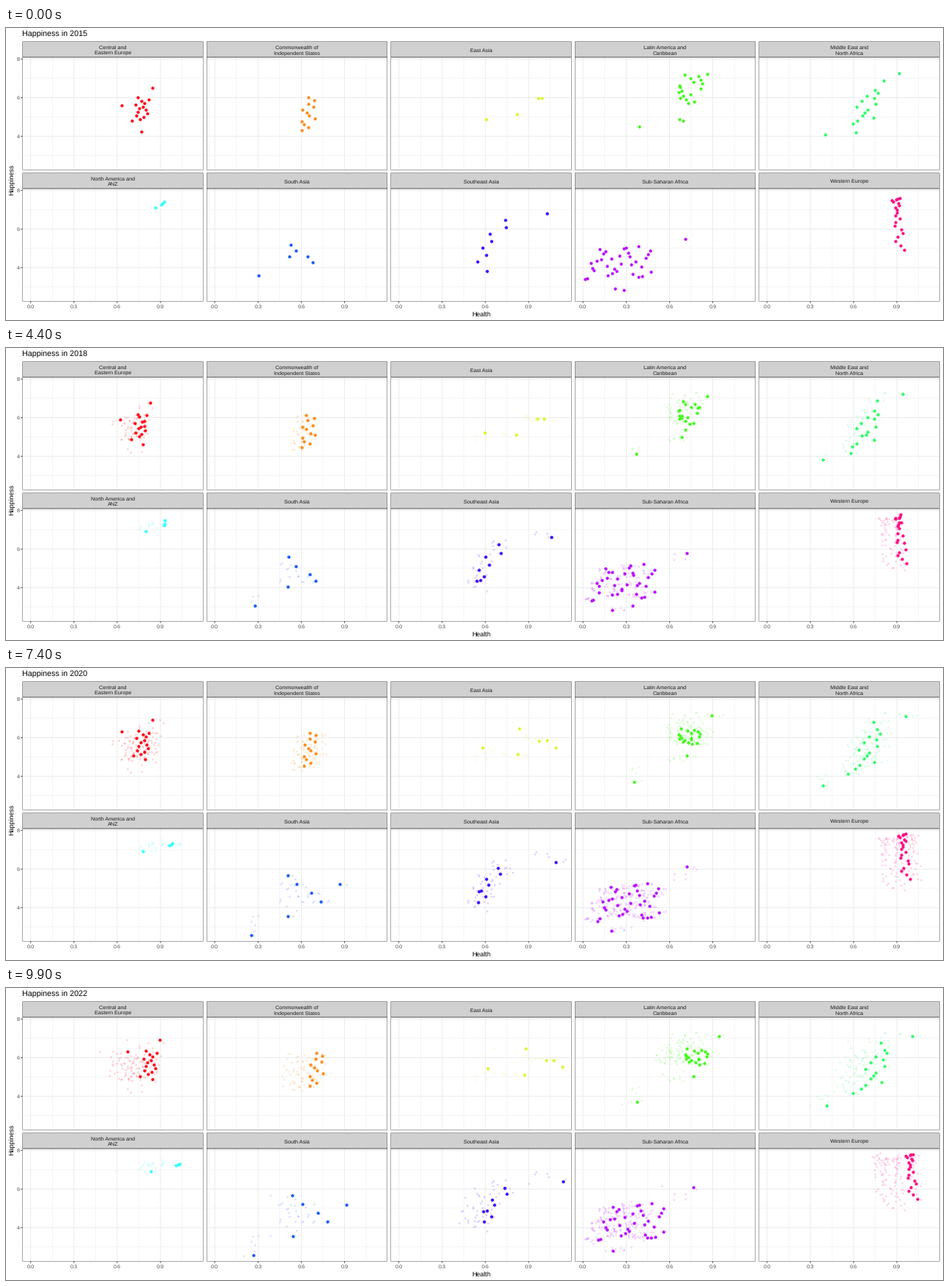
Animation, 1280 px wide and 400 px high, one loop 10 s. Source, as a matplotlib script:

```python
import numpy as np
import matplotlib.pyplot as plt
from matplotlib.animation import FuncAnimation
from matplotlib.patches import Rectangle

W, H = 1280, 400
FRAMES = 100
FIRST, LAST = 2015, 2022
SPAN = LAST - FIRST
KEYS = np.round(np.arange(SPAN + 1) * (FRAMES - 1) / SPAN).astype(int)

UNIT_X, UNIT_Y = 197.0, 26.45      # pixels per unit of health / happiness
PANEL_W, PANEL_H, STRIP_H = 247, 154.5, 21.5
STEP_X, STEP_Y = 251.5, 180
LEFT, TOP = 22.5, 18.5
ZERO_X, EIGHT_Y = 11.2, 24         # offsets of health 0 and happiness 8 in a panel
LINE = .87
DARK, GRID, TICK_TEXT = "#333333", "#e8e8e8", "#4d4d4d"

# Per year: progress from the first to the last pose, and common health shift
PROGRESS = [0, .1, .2, .5, .8, 1, 1, 1]
SHIFT = [0, -.095, -.1, -.05, .04, 0, -.23, 0]
JITTER = [.008, .06]               # yearly wobble of health and happiness
LATE = 5                           # year index at which late countries join

rng = np.random.default_rng(11)

plt.rcParams.update({"font.family": "Liberation Sans", "text.hinting": "none"})
fig = plt.figure(figsize=(W / 72, H / 72), dpi=72, facecolor="white")
ax = fig.add_axes([0, 0, 1, 1])
ax.set_xlim(0, W)
ax.set_ylim(H, 0)
ax.axis("off")


def line(xs, ys, color, width=LINE):
    ax.plot(xs, ys, color=color, lw=width, snap=False, zorder=1,
            solid_capstyle="butt")


def box(x, y, w, h, fill):
    """Box whose border shows only its inner half."""
    d = LINE / 4
    ax.add_patch(Rectangle((x + d, y + d), w - 2 * d, h - 2 * d, fc=fill,
                           ec=DARK, lw=LINE / 2, snap=False, zorder=6))


def label(x, y, text, size, color="black", ha="center", **kw):
    return ax.text(x, y, text, fontsize=size, color=color, ha=ha,
                   va="baseline", **kw)


def draw_panel(col, row, name):
    x, y = LEFT + col * STEP_X, TOP + row * STEP_Y
    top, right = y + STRIP_H, x + PANEL_W
    bottom = top + PANEL_H

    for k in range(8):
        gx = x + ZERO_X + .15 * k * UNIT_X
        line([gx, gx], [top, bottom], GRID, LINE / (1 + k % 2))
        if row == 1 and k % 2 == 0:
            line([gx, gx], [bottom, bottom + 2.3], DARK)
            label(gx, 384.2, f"{.15 * k:.1f}", 7.2, TICK_TEXT)
    for value in range(3, 9):
        gy = y + EIGHT_Y + (8 - value) * UNIT_Y
        line([x, right], [gy, gy], GRID, LINE / (1 + value % 2))
        if col == 0 and value % 2 == 0:
            line([x - 2.3, x], [gy, gy], DARK)
            label(x - 3.8, gy + 2.6, str(value), 7.2, TICK_TEXT, "right")

    box(x, top, PANEL_W, PANEL_H, "none")
    box(x, y, PANEL_W, STRIP_H, "#d0d0d0")
    rows = name.split("\n")
    base = y + 14.1 - 3.9 * (len(rows) - 1)
    for k, text in enumerate(rows):
        label(x + PANEL_W / 2, base + 7.8 * k, text, 7.2, "#1a1a1a", zorder=7)


def cluster(n, first, last, slope, spread, skew=1):
    """Start and end poses of n countries; first and last are the middle
    health and the lowest and highest happiness of the group."""
    rank = np.linspace(0, 1, n) ** skew
    side = spread * rng.permutation(np.linspace(-1, 1, n))
    poses = []
    for health, low, high in (first, last):
        happy = high - (high - low) * rank
        poses.append(np.column_stack(
            [health + slope * (happy - happy.mean()) + side, happy]))
    return np.hstack(poses)


def yearly_poses(moves):
    start, end = moves[:, :2], moves[:, 2:]
    poses = []
    for w, shift in zip(PROGRESS, SHIFT):
        p = start + (end - start) * w
        if 0 < w < 1 or shift:
            p += rng.normal(0, JITTER, p.shape)
        # Countries with low health shift less
        p[:, 0] += shift * np.clip(p[:, 0] / .8, 0, 1)
        p[:, 0] = np.maximum(p[:, 0], 0)
        poses.append(p)
    return poses


regions = []


def add_region(col, row, name, color, group=None, single=(), late=()):
    """Single countries are (health, happiness) at the start and the end;
    late ones have one such pair."""
    draw_panel(col, row, name)
    parts = [] if group is None else [group]
    parts += [[s] for s in single] + [[s + s] for s in late]
    poses = yearly_poses(np.vstack(parts))
    origin = [LEFT + col * STEP_X + ZERO_X,
              TOP + row * STEP_Y + EIGHT_Y + 8 * UNIT_Y]
    poses = [origin + p * [UNIT_X, -UNIT_Y] for p in poses]
    if late:
        for p in poses[:LATE]:
            p[-len(late):] = np.nan
    marks = [ax.scatter(*p.T, s=2.8 ** 2, c=color, alpha=.17, lw=0, zorder=3)
             for p in poses]
    dots = ax.scatter(*poses[0].T, s=4.3 ** 2, c=color, lw=0, zorder=4)
    regions.append((poses, marks, dots))


add_region(0, 0, "Central and\nEastern Europe", "#fb0d1b",
           cluster(14, (.765, 4.8, 6), (.82, 5.05, 6.35), .02, .05),
           [(.844, 6.5, .895, 6.91), (.632, 5.59, .672, 6.32),
            (.766, 4.22, .845, 4.88)])
add_region(1, 0, "Commonwealth of\nIndependent States", "#fd8c1c",
           cluster(12, (.645, 4.3, 6), (.7, 4.55, 6.25), -.03, .065))
add_region(2, 0, "East Asia", "#d5f92d", None,
           [(.605, 4.88, .618, 5.46), (.82, 5.14, .87, 5.12),
            (.967, 5.98, 1.022, 5.87), (.993, 5.98, 1.073, 5.87)],
           [(.88, 6.46), (1.136, 5.51)])
add_region(3, 0, "Latin America and\nCaribbean", "#45f821",
           cluster(17, (.735, 5.7, 7.2), (.78, 5.65, 6.45), .08, .09),
           [(.86, 7.23, .942, 7.12), (.389, 4.52, .375, 3.72),
            (.667, 4.88, .767, 5.05), (.696, 4.79, .8, 5.95)])
add_region(4, 0, "Middle East and\nNorth Africa", "#32fb6a",
           cluster(13, (.69, 4.65, 6.4), (.75, 4.4, 6.4), .04, .07),
           [(.915, 7.27, 1.007, 7.12), (.81, 6.9, .789, 6.79),
            (.4, 4.08, .415, 3.53), (.618, 4.2, .595, 4.15)])
add_region(0, 1, "North America and\nANZ", "#36fdfe",
           cluster(3, (.915, 7.28, 7.43), (1.02, 7.22, 7.3), -.05, .013),
           [(.862, 7.12, .832, 6.93)])
add_region(1, 1, "South Asia", "#1a5bf8",
           cluster(4, (.603, 4.28, 5.2), (.66, 4.33, 5.69), -.21, .02),
           [(.303, 3.58, .266, 2.57), (.515, 4.56, .54, 3.57)],
           [(.913, 5.2)])
add_region(2, 1, "Southeast Asia", "#3c02f9",
           cluster(7, (.64, 4.3, 6.45), (.66, 4.3, 6.05), .12, .05),
           [(1.025, 6.8, 1.138, 6.38), (.611, 3.82, .587, 4.85)])
add_region(3, 1, "Sub-Saharan Africa", "#b816f9",
           cluster(33, (.25, 3.4, 5.1), (.34, 3.35, 5.25), .01, .225),
           [(.709, 5.48, .765, 6.1), (.224, 2.9, .208, 2.82),
            (.285, 2.84, .445, 3.47)])
add_region(4, 1, "Western Europe", "#fb1086",
           cluster(20, (.905, 4.9, 7.6), (.997, 5.5, 7.8), -.01, .03, 1.7))

title = label(22.3, 12.2, "", 10.7, ha="left")
label(649, 394.6, "Health", 9)
label(10.8, 207.3, "Happiness", 9, rotation=90, rotation_mode="anchor")


def draw(i):
    title.set_text(f"Happiness in {FIRST + SPAN * i // (FRAMES - 1)}")
    k = min(np.searchsorted(KEYS, i, side="right") - 1, SPAN - 1)
    t = (i - KEYS[k]) / (KEYS[k + 1] - KEYS[k])
    for poses, marks, dots in regions:
        dots.set_offsets(poses[k] + (poses[k + 1] - poses[k]) * t)
        for mark, key in zip(marks, KEYS):
            mark.set_visible(key < i)
    return [title]


anim = FuncAnimation(fig, draw, frames=FRAMES, interval=100, repeat=True,
                     repeat_delay=0, init_func=lambda: draw(0))
plt.show()
```
